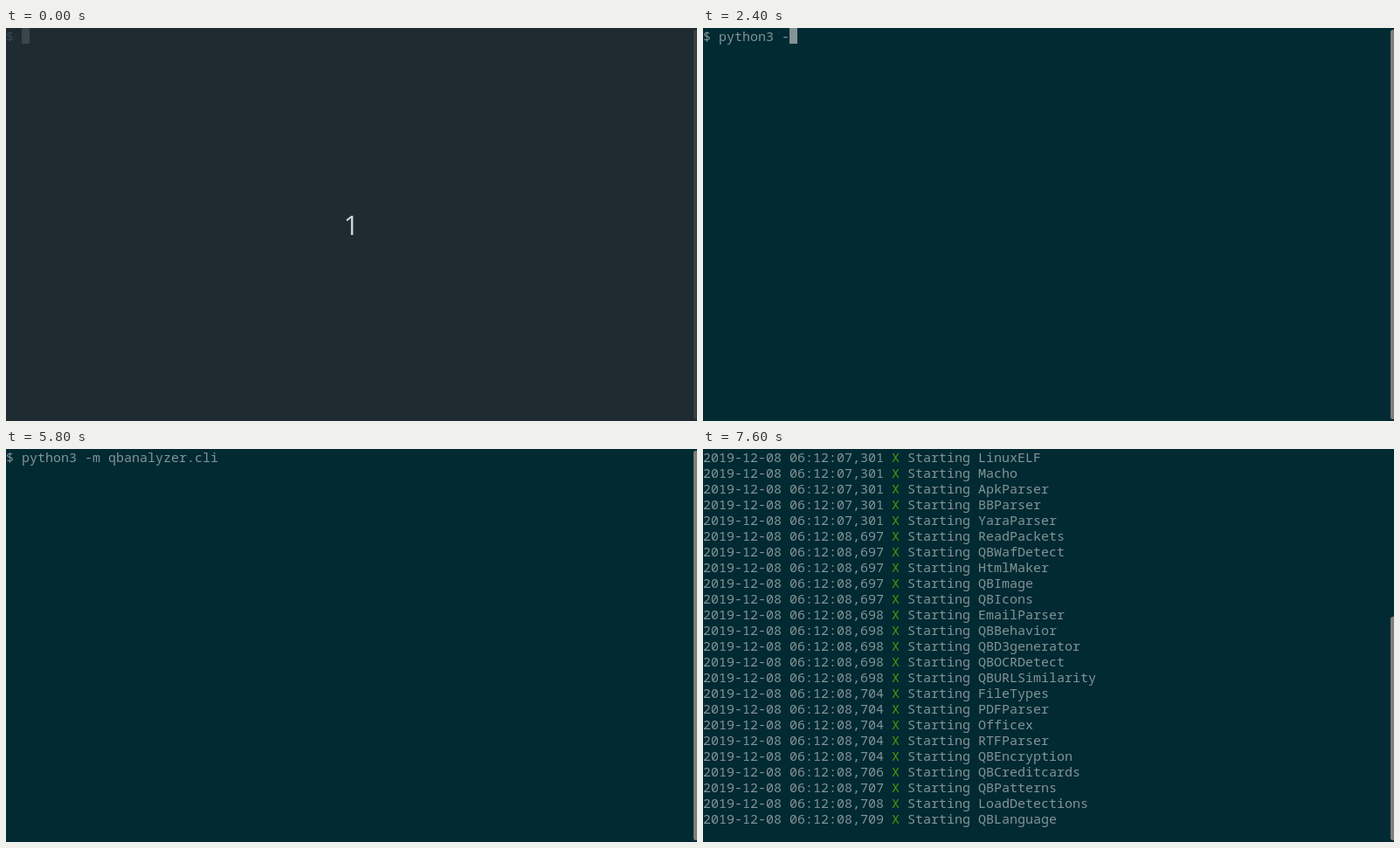
Write an HTML page that moves like this. It is 791 by 450 pixels and loops after 8 s.

```html
<!DOCTYPE html>
<html lang="en">
<head>
<meta charset="utf-8">
<title>Terminal session</title>
<style>
  html, body { margin: 0; width: 100%; height: 100%; overflow: hidden; background: #012a33; }
  svg { display: block; width: 100vw; height: 100vh; }
  #rows text { font: 15px "Noto Sans Mono", monospace; fill: #839496; white-space: pre; }
  #rows .mark { fill: #4e9a06; }
  #count { font: 500 31px "Open Sans", sans-serif; fill: #c8d9db; }
</style>
</head>
<body>
<svg viewBox="0 0 791 450" preserveAspectRatio="none">
  <rect id="back" width="791" height="450"/>
  <g id="screen">
    <g id="rows"></g>
    <rect id="cursor" width="9" height="18" fill="#839496"/>
    <rect id="thumb" x="787" width="8" rx="2.5" fill="#7e7f79"/>
  </g>
  <text id="count" x="386.5" y="237">1</text>
</svg>
<script>
const LOOP = 8000, CELL_W = 9, CELL_H = 18, ROWS = 25;
const $ = id => document.getElementById(id);

const command = 'python3 -m qbanalyzer.cli';
const keyTimes = [700, 800, 1000, 1200, 1400, 1500, 1900, 2000, 2400, 2500, 2700, 3000, 3400,
  3600, 3700, 3800, 4000, 4200, 4300, 4500, 4600, 4800, 4900, 5000, 5200];

const banner = String.raw`
 _____   _____   _____  __   _  _____        \   / ______  ______  _____
|     | |_____] |_____| | \  | |_____| |      \_/   ____/ |______ |_____/
|____\| |_____] |     | |  \_| |     | |_____  |   /_____ |______ |    \
      \ 2019.V.01.10                           |
                                   https://github.com/kx507tm2/QBAnalyzer
`.split('\n');

const batches = [
  ['07,214', 'StaticAnalyzer'],
  ['07,215', 'QBMitresearch MitreParser'],
  ['07,215', ''],
  ['07,301', 'WindowsPe LinuxELF Macho ApkParser BBParser YaraParser'],
  ['08,697', 'ReadPackets QBWafDetect HtmlMaker QBImage QBIcons'],
  ['08,698', 'EmailParser QBBehavior QBD3generator QBOCRDetect QBURLSimilarity'],
  ['08,704', 'FileTypes PDFParser Officex RTFParser QBEncryption'],
  ['08,706', 'QBCreditcards'],
  ['08,707', 'QBPatterns'],
  ['08,708', 'LoadDetections'],
  ['08,709', 'QBLanguage']
];
const log = batches.flatMap(([stamp, names]) => names.split(' ').map(name =>
  `2019-12-08 06:12:${stamp} X ` + (name ? 'Starting ' + name : 'Parsing Mitre databases')));

// [time, log lines printed so far]
const prints = [[6100, 4], [6400, 10], [7500, 20], [7600, log.length]];

function addText(y, x = 0, cls = '') {
  const el = document.createElementNS('http://www.w3.org/2000/svg', 'text');
  el.setAttribute('x', x);
  el.setAttribute('y', y);
  el.setAttribute('class', cls);
  $('rows').append(el);
  return el;
}

const rows = Array.from({ length: ROWS }, (_, i) => {
  const y = i * CELL_H + 15;
  return { text: addText(y), mark: addText(y, 24 * CELL_W, 'mark') };
});

function setText(el, value) {
  if (el.textContent !== value) el.textContent = value;
}

function screenLines(t) {
  const typed = keyTimes.filter(k => k <= t).length;
  const lines = ['$ ' + command.slice(0, typed)];
  if (t < 5900) return lines;
  const printed = prints.reduce((n, [at, count]) => t >= at ? count : n, 0);
  return lines.concat(banner, log.slice(0, printed));
}

function render(t) {
  const intro = t < 500;
  const lines = screenLines(t);
  const scroll = Math.max(0, lines.length + 1 - ROWS);

  rows.forEach(({ text, mark }, i) => {
    const line = lines[i + scroll] || '';
    const isLog = line.startsWith('2019-');
    setText(text, isLog ? line.replace(' X ', '   ') : line);
    setText(mark, isLog ? 'X' : '');
  });

  const typing = t < 5500;
  const shown = t < 5800 || (t >= 6400 && t < 7000);
  $('cursor').setAttribute('visibility', shown ? 'visible' : 'hidden');
  $('cursor').setAttribute('x', typing ? lines[0].length * CELL_W : 0);
  $('cursor').setAttribute('y', typing ? 0 : lines.length * CELL_H);

  const top = 2 + scroll * 190 / 13;
  $('thumb').setAttribute('y', top);
  $('thumb').setAttribute('height', 448 - top);

  $('back').setAttribute('fill', intro ? '#1f2b31' : '#012a33');
  $('screen').setAttribute('opacity', intro ? 0.26 : 1);
  $('count').setAttribute('visibility', intro ? 'visible' : 'hidden');
}

const start = performance.now();
function tick() {
  render((performance.now() - start) % LOOP);
  requestAnimationFrame(tick);
}
tick();
</script>
</body>
</html>
```
